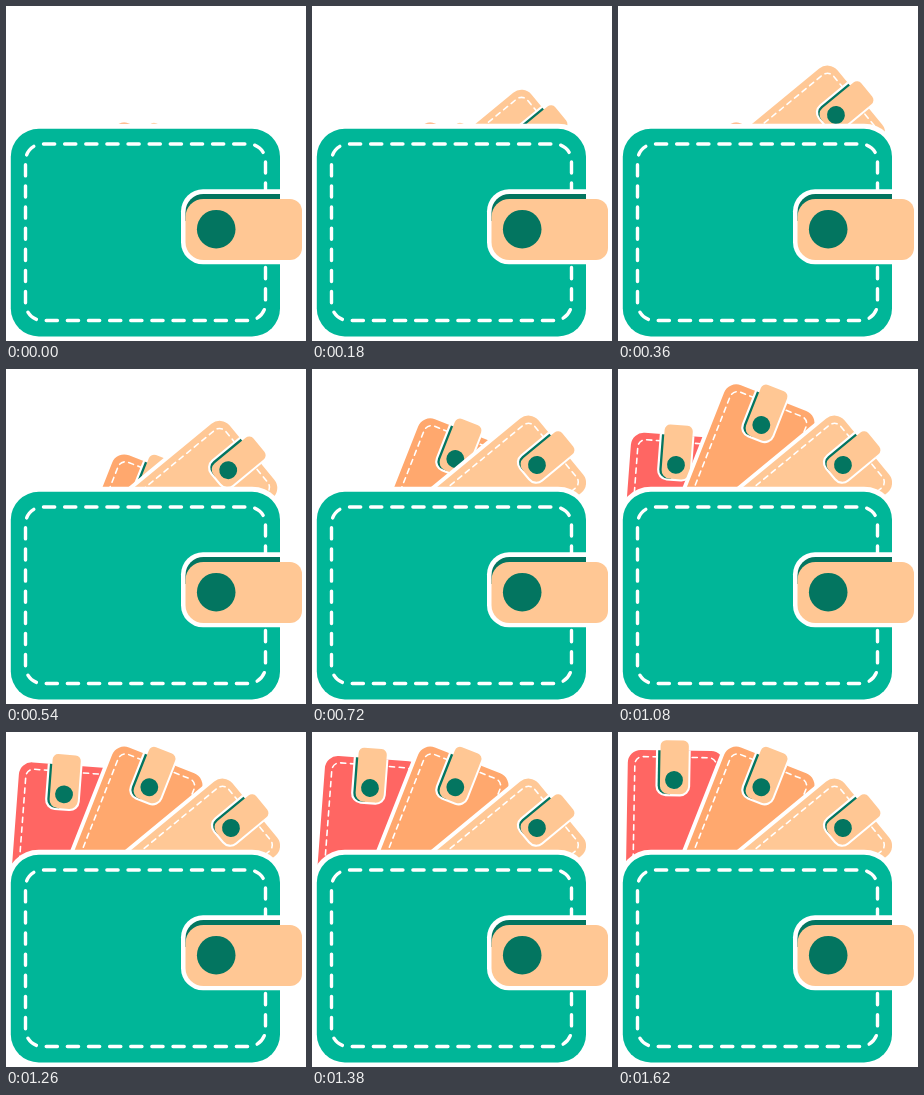
An HTML page with a canvas that plays this animation: 300 px wide and 335 px high, repeating every 1.68 s.

```html
<!DOCTYPE html>
<html lang="en">
<head>
<meta charset="utf-8">
<title>Wallets</title>
<style>
  html, body { margin: 0; width: 100%; height: 100%; overflow: hidden; background: #fff; }
  canvas { display: block; width: 300px; height: 335px; }
</style>
</head>
<body>
<canvas id="stage" width="300" height="335"></canvas>
<script>
const ctx = document.getElementById('stage').getContext('2d');
const LOOP = 1680, STEP = 60;
const GREEN = '#00b698', DARK = '#037560', PEACH = '#ffc794', WHITE = '#fff';
const BUTTON = { x: 210.2, y: 223.2 };
const CARD_SCALE = 0.463;
const STITCH = 21.13;

// Each card rises by `lift` from `start` to `end`, then drifts by (dx, dy, tilt) until `rest`.
const cards = [
  { color: '#ff6663', x: 56, y: 48, angle: -89, lift: 129, start: 840, end: 1380,
    rest: 1620, dx: 2, dy: 8, tilt: 3.3 },
  { color: '#ffa86e', x: 143.3, y: 55.3, angle: -68.5, lift: 102, start: 420, end: 1140,
    rest: 1200, dx: 0, dy: 0, tilt: 0 },
  { color: '#ffc896', x: 225, y: 96, angle: -39.5, lift: 67, start: 60, end: 360,
    rest: 660, dx: -7, dy: 13, tilt: 0 }
];

// Fraction of the span from a to b still to go at time t.
const remaining = (t, a, b) => Math.min(1, Math.max(0, (b - t) / (b - a)));

function box(left, top, right, bottom, radii) {
  ctx.beginPath();
  ctx.roundRect(left, top, right - left, bottom - top, radii);
}

function fill(color) {
  ctx.fillStyle = color;
  ctx.fill();
}

function wallet(color, outline, extra = 0) {
  box(4.8 - extra, 122.8, 274, 330.4, 28);
  ctx.strokeStyle = WHITE;
  ctx.lineWidth = outline * 2;
  ctx.stroke();
  fill(color);

  // Stitching
  box(19.5 - extra, 138, 259.5, 314.5, 17);
  ctx.lineWidth = 3.4;
  ctx.lineCap = 'round';
  ctx.setLineDash([STITCH * 0.53, STITCH * 0.47]);
  ctx.lineDashOffset = -1;
  ctx.stroke();
  ctx.setLineDash([]);

  // Strap with its gap and shadow
  box(175, 183.3, 274.5, 258.3, [22, 0, 0, 22]);
  fill(WHITE);
  box(179.5, 188, 274, 215, [18, 0, 0, 0]);
  fill(DARK);
  box(179.5, 193, 296, 254, [18, 12, 12, 18]);
  fill(PEACH);
  ctx.beginPath();
  ctx.arc(BUTTON.x, BUTTON.y, 19.3, 0, Math.PI * 2);
  fill(DARK);
}

function drawCard(card, t) {
  const rise = card.lift * remaining(t, card.start, card.end) ** 2;
  const drift = remaining(t, card.end, card.rest);
  ctx.save();
  ctx.translate(card.x + card.dx * drift, card.y + card.dy * drift + rise);
  ctx.rotate((card.angle + card.tilt * drift) * Math.PI / 180);
  ctx.scale(CARD_SCALE, CARD_SCALE);
  ctx.translate(-BUTTON.x, -BUTTON.y);
  wallet(card.color, 8.5, STITCH * 2);
  ctx.restore();
}

function frame() {
  const t = Math.floor(performance.now() % LOOP / STEP) * STEP;
  ctx.fillStyle = WHITE;
  ctx.fillRect(0, 0, 300, 335);
  cards.forEach(card => drawCard(card, t));
  wallet(GREEN, 5);
  requestAnimationFrame(frame);
}
frame();
</script>
</body>
</html>
```
